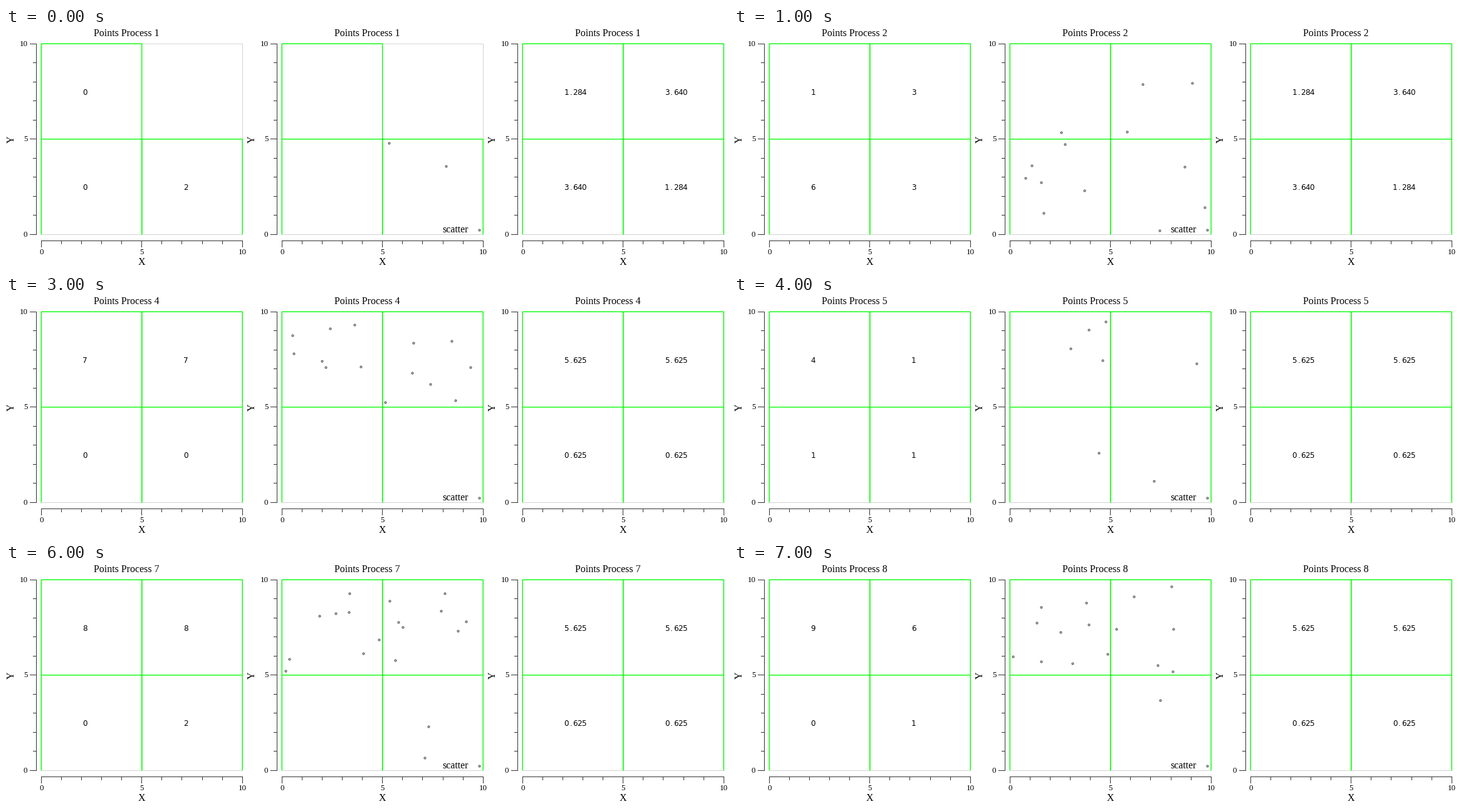
Recreate the animation shown at these times as a matplotlib script. Size 1152 by 384 pixels, loop 8 s.

```python
import matplotlib.pyplot as plt
import numpy as np
from matplotlib.animation import FuncAnimation

W, H, DPI = 1152, 384, 96
PT = 72 / DPI  # points per pixel
PANEL, PITCH = 384, 7
LEFT, RIGHT, TOP, BOTTOM = 56.2, 377.2, 25.2, 330.4
CELL_W, CELL_H = (RIGHT - LEFT) / 2, (BOTTOM - TOP) / 2
QUADS = [(col, row) for row in range(2) for col in range(2)]
UPPER_RIGHT = 1
GREEN, GRAY, AXIS = "#00ff00", "#d3d3d3", "#333333"

# Points per quadrant: upper left, upper right, lower left, lower right
COUNTS = [(0, 0, 0, 2), (1, 3, 6, 3), (7, 5, 0, 2), (7, 7, 0, 0),
          (4, 1, 1, 1), (8, 6, 1, 0), (8, 8, 0, 2), (9, 6, 0, 1)]
RATES = [("1.284", "3.640", "3.640", "1.284"),
         ("5.625", "5.625", "0.625", "0.625")]
LEGEND_DOT = (754.7, 323.3)

fig = plt.figure(figsize=(W / DPI, H / DPI), dpi=DPI, facecolor="white")
ax = fig.add_axes([0, 0, 1, 1])
ax.set_xlim(0, W)
ax.set_ylim(H, 0)
ax.axis("off")


def line(xs, ys, color=AXIS, width=1.0, z=2):
    return ax.plot(xs, ys, color=color, lw=width * PT, zorder=z, snap=False,
                   solid_capstyle="butt", solid_joinstyle="miter")[0]


def label(x, y, text, size=16, family="Liberation Serif", **kw):
    kw = {"ha": "center", "va": "baseline", **kw}
    return ax.text(x, y, text, fontsize=size * PT, color="black",
                   family=family, zorder=5, **kw)


def corner(off, quad):
    """Top left corner of a quadrant in the panel that starts at off."""
    col, row = quad
    return off + LEFT + col * CELL_W, TOP + row * CELL_H


def pixel(value):
    return int(value) + 0.5


def draw_scales(off):
    x0, x1 = pixel(off + LEFT), pixel(off + RIGHT)
    y0, y1 = pixel(TOP), pixel(BOTTOM)
    line([x0, x1, x1, x0, x0], [y0, y0, y1, y1, y0], GRAY, z=1)
    line([off + 48.5] * 2, [y0 - .5, y1 + .5])
    line([x0 - .5, x1 + .5], [340.5] * 2)
    for i in range(11):
        x = pixel(off + LEFT + i * CELL_W / 5)
        y = pixel(BOTTOM - i * CELL_H / 5)
        major = i % 5 == 0
        size = 11 if major else 6
        line([off + 49 - size, off + 48], [y, y])
        line([x, x], [341, 340 + size])
        if major:
            label(off + 34.5, y + 3.5, str(i), 13, ha="right")
            label(x, 362, str(i), 13)
    label(off + LEFT + CELL_W, 379, "X")
    label(off + 12.5, 178, "Y", rotation=90, rotation_mode="anchor")


def draw_quadrant(off, quad):
    """Each quadrant outlines its left, top and right side."""
    x, y = corner(off, quad)
    return line([x, x, x + CELL_W, x + CELL_W],
                [y + CELL_H, y, y, y + CELL_H], GREEN, 1.35, 3)


def number_cells(off, quad, length):
    """Fixed pitch text: one artist for each character."""
    x, y = corner(off, quad)
    return [label(x + 70 + PITCH * i, y + 81.6, "", 12, "DejaVu Sans")
            for i in range(length)]


def write(cells, text):
    for cell, char in zip(cells, text):
        cell.set_text(char)


def scatter(frame):
    rng = np.random.default_rng(frame)
    spots = [LEGEND_DOT]
    for quad, count in zip(QUADS, COUNTS[frame]):
        low = np.array(corner(PANEL, quad)) + 4
        spots += list(low + rng.random((count, 2)) * (CELL_W - 8, CELL_H - 8))
    return np.array(spots)


titles, outlines = [], []
for k in range(3):
    draw_scales(PANEL * k)
    titles.append(label(PANEL * k + 192, 13, ""))
    outlines.append([draw_quadrant(PANEL * k, quad) for quad in QUADS])
count_cells = [number_cells(0, quad, 1) for quad in QUADS]
rate_cells = [number_cells(2 * PANEL, quad, 5) for quad in QUADS]
label(716.7, 327, "scatter")
dots, = ax.plot([], [], "o", ms=3 * PT, mfc="white", mec="black",
                mew=0.75 * PT, zorder=4, snap=False)


def update(frame):
    partial = frame == 0  # upper right quadrant is still empty
    for title in titles:
        title.set_text(f"Points Process {frame + 1}")
    for panel in outlines[:2]:
        panel[UPPER_RIGHT].set_visible(not partial)
    dots.set_data(*scatter(frame).T)

    rates = RATES[frame >= 2]
    for i in range(len(QUADS)):
        hidden = partial and i == UPPER_RIGHT
        write(count_cells[i], " " if hidden else str(COUNTS[frame][i]))
        write(rate_cells[i], rates[i])
    return [dots]


anim = FuncAnimation(fig, update, frames=len(COUNTS), interval=1000,
                     repeat=True, repeat_delay=0, blit=False)
plt.show()
```
